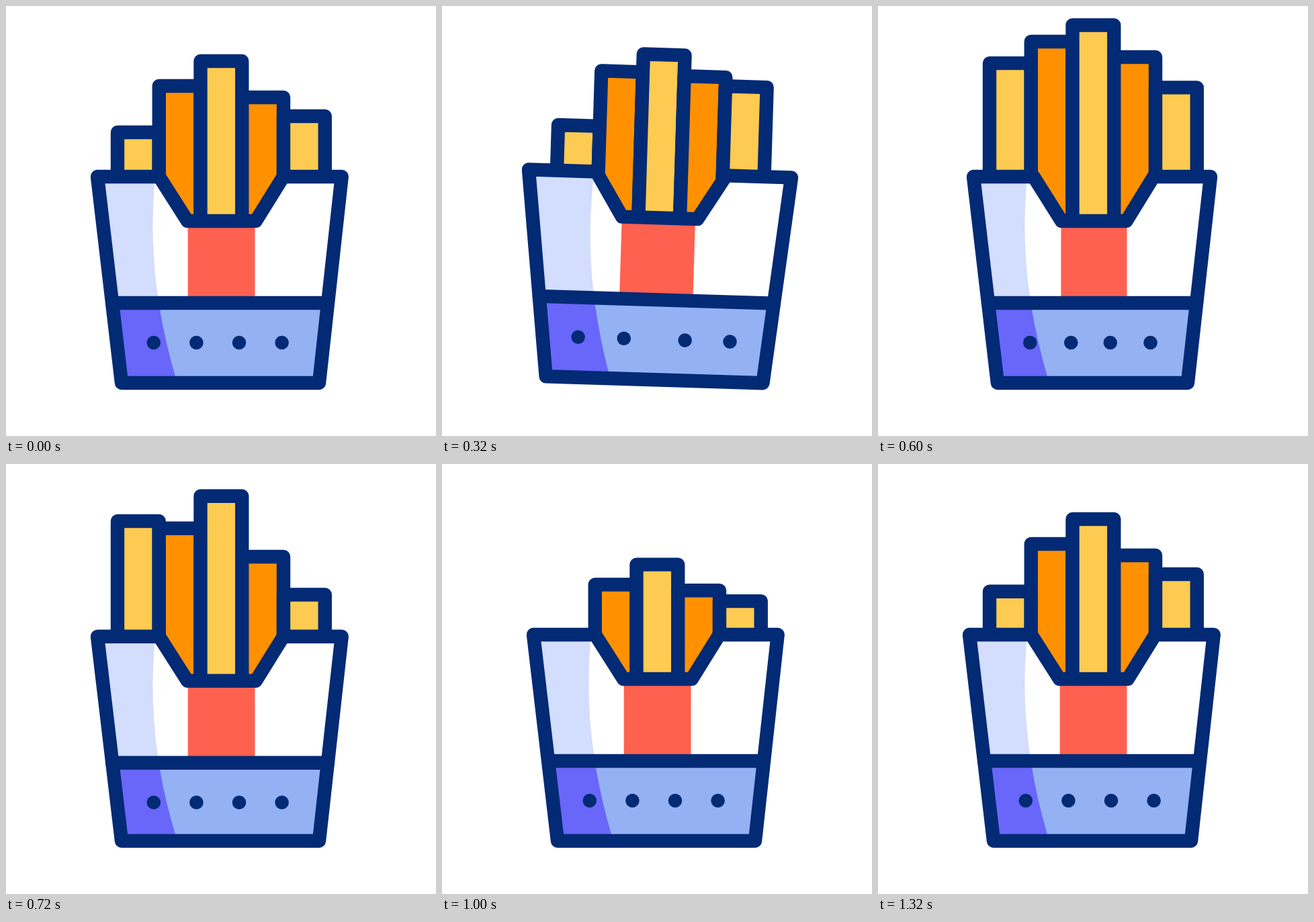
Write an HTML page with a canvas that moves like this. It is 640x640 px and loops after 1480 ms.

```html
<!DOCTYPE html>
<html lang="en">
<head>
<meta charset="utf-8">
<title>Fries</title>
<style>
  html, body { margin: 0; width: 100%; height: 100%; overflow: hidden; background: #fff; }
  canvas { display: block; width: 640px; height: 640px; }
</style>
</head>
<body>
<canvas id="stage" width="640" height="640"></canvas>
<script>
const ctx = document.getElementById('stage').getContext('2d');
const LOOP = 1480, STEP = 40;
const NAVY = '#032a74', YELLOW = '#fecb52', ORANGE = '#ff9100', RED = '#ff6151',
      LILAC = '#d3ddfd', VIOLET = '#6966fa', BLUE = '#94b1f3';
const TOP = 254, BAND = 442, BOTTOM = 561;

// Fries from left to right; order is the place in the rising wave.
const FRY_WIDTH = 61.75;
const fries = [
  { order: 4, color: YELLOW, rest: 188, high: 76, low: 267 },
  { order: 2, color: ORANGE, rest: 119, high: 52, low: 185 },
  { order: 3, color: YELLOW, rest: 82, high: 28, low: 150 },
  { order: 1, color: ORANGE, rest: 136, high: 65, low: 205 },
  { order: 0, color: YELLOW, rest: 164, high: 90, low: 237 }
];

const lerp = (a, b, u) => a + (b - a) * u;

// Sine ease from 0 to 1 between two times.
function ease(t, from, to) {
  const u = Math.min(1, Math.max(0, (t - from) / (to - from)));
  return (1 - Math.cos(Math.PI * u)) / 2;
}

// Soft hump that rises to 1 halfway and returns to 0.
function pulse(t, from, to) {
  const mid = (from + to) / 2;
  return ease(t, from, mid) - ease(t, mid, to);
}

function fryTop({ order, rest, high, low }, t) {
  const peak = 490 + 45 * order, dip = peak + 360;
  return rest + (high - rest) * ease(t, peak - 380, peak)
              + (low - high) * ease(t, peak, dip)
              + (rest - low) * ease(t, dip, dip + 320);
}

function poly(points, close = true) {
  const p = new Path2D();
  points.forEach(([x, y]) => p.lineTo(x, y));
  if (close) p.closePath();
  return p;
}

function fill(path, color) {
  ctx.fillStyle = color;
  ctx.fill(path);
}

// Fills everything left of a curved edge, inside the given shape.
function shade(shape, x0, y0, cx, cy, x1, y1, color) {
  const p = new Path2D();
  p.moveTo(0, y0 - 20);
  p.lineTo(x0, y0 - 20);
  p.lineTo(x0, y0);
  p.quadraticCurveTo(cx, cy, x1, y1);
  p.lineTo(x1, y1 + 20);
  p.lineTo(0, y1 + 20);
  ctx.save();
  ctx.clip(shape);
  fill(p, color);
  ctx.restore();
}

function drawFry(fry, i, t) {
  const x = 166 + FRY_WIDTH * i, y = fryTop(fry, t);
  const p = poly([[x, 360], [x, y], [x + FRY_WIDTH, y], [x + FRY_WIDTH, 360]], false);
  fill(p, fry.color);
  ctx.stroke(p);
}

function drawBox(wide, narrow, sink) {
  const flex = (x, w, n) => x + w * wide + n * narrow;
  const top = TOP + sink, band = BAND + sink, dip = 320 + sink;
  const topL = flex(136, -14.5, 19.5), topR = flex(499.7, 18.8, -15.3);
  const botL = flex(172, -15.5, 19), botR = flex(466, 19.5, -16.5);

  // The sides stay straight when the rim sinks; the band keeps its length.
  const u = (band - top) / (BOTTOM - top), v = (BAND - TOP) / (BOTTOM - TOP);
  const sideL = [lerp(topL, botL, u), band], sideR = [lerp(topR, botR, u), band];
  const rim = [
    [topL, top], [flex(228, -4, 11.5), top], [flex(270, -6, 10), dip],
    [flex(371.7, 7, -6.7), dip], [flex(412.7, 6.5, -8), top], [topR, top]
  ];
  const base = [[botR, BOTTOM], [botL, BOTTOM]];
  const upper = poly([...rim, sideR, sideL]);
  const lower = poly([sideL, sideR, ...base]);

  fill(lower, BLUE);
  shade(lower, 229, 452 + sink, 237, 500 + sink * 0.6, 252, 551, VIOLET);
  fill(upper, '#fff');
  shade(upper, 221, 264 + sink, 214, 350 + sink, 226, 432 + sink, LILAC);
  const redL = flex(270.7, -7, 5.5), redR = flex(370.5, 4.5, 0);
  fill(poly([[redL, dip], [redR, dip], [redR, band], [redL, band]]), RED);
  ctx.stroke(poly([...rim, ...base]));
  ctx.stroke(poly([[lerp(topL, botL, v), band], [lerp(topR, botR, v), band]], false));

  const dots = [flex(219.8, -17.5, 21), flex(283.4, -12, 12.5), flex(347, 21, -4), flex(410.6, 25, -16.5)];
  for (const x of dots) {
    const p = new Path2D();
    p.arc(x, 501 + sink, 10.3, 0, Math.PI * 2);
    fill(p, NAVY);
  }
}

function draw(t) {
  const wide = pulse(t, 40, 480), narrow = pulse(t, 340, 660), sink = 19 * pulse(t, 680, 1000);
  ctx.fillStyle = '#fff';
  ctx.fillRect(0, 0, 640, 640);
  ctx.save();
  ctx.translate(473, 410);
  ctx.rotate(2.13 * wide * Math.PI / 180);
  ctx.translate(-473, -410);
  ctx.strokeStyle = NAVY;
  ctx.lineWidth = 20.4;
  ctx.lineJoin = ctx.lineCap = 'round';
  fries.forEach((fry, i) => drawFry(fry, i, t));
  drawBox(wide, narrow, sink);
  ctx.restore();
}

const start = performance.now();
function tick() {
  const t = (performance.now() - start) % LOOP;
  draw(Math.floor(t / STEP) * STEP);
  requestAnimationFrame(tick);
}
tick();
</script>
</body>
</html>
```
